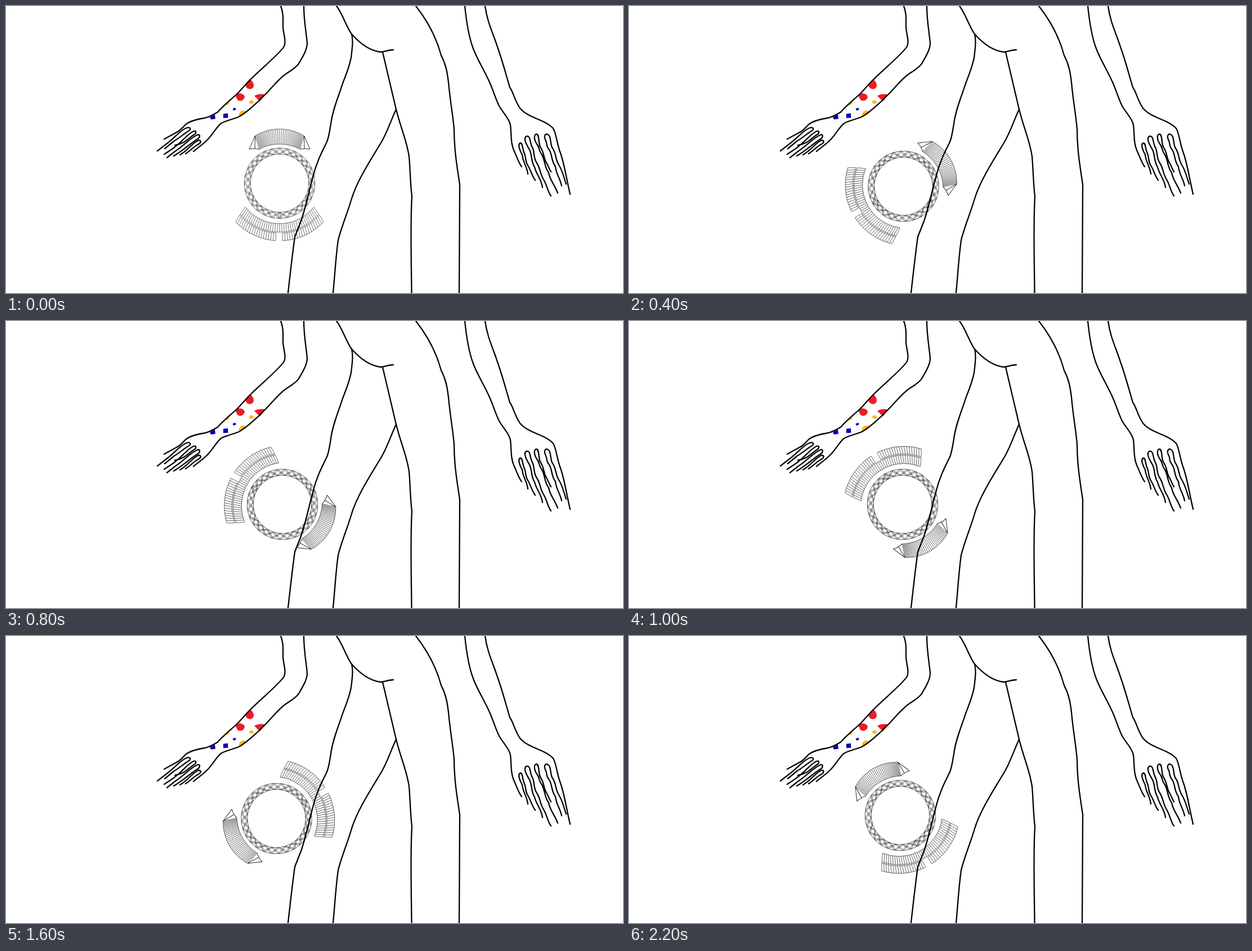
These frames come from a looping animation (1096x511 px, 2400 ms). An HTML page:

```html
<!DOCTYPE html>
<html lang="en">
<head>
<meta charset="utf-8">
<title>Turning ornament</title>
<style>
  html, body { margin: 0; width: 100%; height: 100%; overflow: hidden; background: #fff; }
  svg { display: block; width: 100%; height: 100%; }
  path { stroke-linejoin: round; }
</style>
</head>
<body>
<svg viewBox="0 0 1096 511">
  <g id="ornament" fill="none" stroke="#222" stroke-width=".65">
    <circle r="62.8"/>
    <circle r="51.8"/>
    <path id="lattice"/>
    <path id="bands"/>
    <path d="M-43.5-84.5L-54-60.5Q-45-63-36-60.5M-43.5-84.5L-44-61M43.5-84.5L54-60.5Q45-63 36-60.5M43.5-84.5L44-61" stroke="#111" stroke-width=".9"/>
  </g>

  <g fill="#ed1c24">
    <path d="M434 130L438 135C443 143 438 148 433 148C427 147 424 143 427 138Z"/>
    <path d="M407 158C412 153 424 156 424 162C422 170 412 171 410 165Z"/>
    <path d="M441 160C448 156 456 156 460 158L451 170Z"/>
  </g>
  <g fill="#fdb913">
    <path d="M388 176L395 169C399 174 395 177 388 176Z"/>
    <ellipse cx="436" cy="171" rx="4" ry="3"/>
    <path d="M414 197C412 186 424 183 427 189Z"/>
  </g>
  <g fill="#0404b4">
    <path d="M386 192L394 191 394.500 199 386 199.500Z"/>
    <path d="M402.500 183L407 181 409 184 404.500 186.500Z"/>
    <path d="M362 198L371 193 372 201 364 202Z"/>
  </g>

  <g fill="none" stroke="#000" stroke-width="2.3" stroke-linecap="round">
    <!-- left arm and hand -->
    <path d="M488 0C493 12 492 22 492 37C493 52 498 62 494 72C486 85 455 110 432 133L411 156C398 168 385 178 376 189C366 195 358 199 350 200C338 202 325 205 318 212C313 217 310 222 301 226L281 237"/>
    <path d="M529 0C529 25 533 45 535 66C535 78 527 90 521 101C517 109 506 115 497 121C483 131 472 146 460 158L449 169C437 180 425 192 412 198C402 202 390 204 382 209C374 215 368 228 357 239C347 249 342 251 333 259"/>
    <path d="M269 258L287 244C300 234 310 221 321 217C328 215 329 220 325 222C315 228 307 236 299 240L282 254"/>
    <path d="M281 264L296 254C312 243 322 228 333 223C339 221 338 227 334 229C322 237 318 245 300 248"/>
    <path d="M286 270L300 259C318 247 328 234 341 229C346 229 344 235 340 237C328 244 318 255 298 267"/>
    <path d="M309 265C322 258 332 243 342 239C348 239 346 244 342 246C334 250 328 257 319 263"/>
    <!-- right arm and hand -->
    <path d="M815 0C818 30 822 55 830 76C838 97 850 115 860 138C866 152 870 166 876 178C884 192 894 200 896 212C898 228 896 245 903 259C908 270 911 280 916 286"/>
    <path d="M851 0C855 30 866 50 873 73C882 98 888 122 895 145C902 155 902 165 913 182C928 200 958 202 972 218C978 228 978 244 985 262C992 282 995 305 1002 335"/>
    <path d="M927 299C925 284 918 278 917 265C911 254 909 245 914 244C918 244 917 255 921 263C924 270 922 276 927 284C933 294 934 302 940 310"/>
    <path d="M953 323C951 308 942 300 939 287C932 276 935 266 930 256C926 249 918 237 924 232C932 230 930 241 934 250C940 259 936 268 942 278C950 290 948 298 955 309C961 319 962 330 968 338"/>
    <path d="M980 333C974 317 966 310 964 297C956 286 958 276 952 265C945 256 948 250 943 246C937 236 938 229 942 228C948 229 945 241 949 251C957 262 954 270 960 279C964 286 965 291 968 295"/>
    <path d="M987 320C984 306 977 299 976 286C968 275 971 266 965 256C958 248 962 243 958 238C955 231 958 228 961 228C969 231 966 242 970 252C978 262 975 272 982 283C989 294 991 306 995 317"/>
    <!-- torso and legs -->
    <path d="M587 0C598 14 604 36 614 50C630 68 648 80 666 82C675 81 680 78 688 78"/>
    <path d="M614 50C617 62 615 75 613 92C609 112 603 124 598 138C590 163 580 185 577 210C574 228 573 237 569 244C560 262 551 280 545 305C537 335 532 360 524 383L513 411C509 440 505 475 501 511"/>
    <path d="M669 82L693 184C702 220 712 240 716 268C718 290 718 315 721 339C718 390 720 450 720.500 511"/>
    <path d="M693 184C684 203 677 225 667 242C649 272 624 310 614 343C606 370 596 393 590 417C586 445 584 480 581 511"/>
    <path d="M728 0C750 28 765 58 773 88C782 105 784 120 786 136C789 170 794 195 796 220C796 255 801 285 806 318L805 511"/>
  </g>
</svg>
<script>
const byId = id => document.getElementById(id);

// Angles run from straight down; a negative radius points up.
function point(radius, degrees, cy = 0) {
  const a = degrees * Math.PI / 180;
  return `${(radius * Math.sin(a)).toFixed(2)} ${(cy + radius * Math.cos(a)).toFixed(2)}`;
}
const line = points => 'M' + points.join('L');

// A ribbed strip between two arcs; from and to are shares of each half angle.
// A positive bunch crowds the ribs towards the ends.
function strip(inner, outer, from, to, count, bunch = 0) {
  const shares = Array.from({ length: count + 1 }, (_, i) => {
    const s = from + (to - from) * i / count;
    return s + bunch * Math.sin(Math.PI * s) / Math.PI;
  });
  const edge = ({ cy, r, half }) => shares.map(s => point(r, half * s, cy));
  const a = edge(inner), b = edge(outer);
  return line(a) + line(b) + a.map((p, i) => line([p, b[i]])).join('');
}

const skirt = r => ({ cy: -5, r, half: 52 - (r - 77) * .177 });
byId('bands').setAttribute('d',
  strip({ cy: 7, r: -76.5, half: 28 }, { cy: -13.5, r: -83, half: 31.6 }, -1, 1, 34, .3) +
  strip(skirt(77), skirt(92), -1, 1, 38) +
  strip(skirt(94), skirt(107.5), -1, -.08, 18) +
  strip(skirt(94), skirt(107.5), .06, 1, 18));

const cells = 28, cell = 360 / cells;
let lattice = line([point(51.8, -1.5), point(62.8, -1.5)]) + line([point(51.8, 1.5), point(62.8, 1.5)]);
for (let i = 0; i < cells; i++) {
  for (const shift of [-1.4, 1.4]) {
    const a = i * cell + shift;
    lattice += line([point(51.8, a), point(62.8, a + cell)]) + line([point(62.8, a), point(51.8, a + cell)]);
  }
}
byId('lattice').setAttribute('d', lattice);

// The ring sits off the pivot; the second half turn mirrors the first.
const pivot = [484, 323];
const offsets = [[2, -7.5], [3, -7.5], [3.5, -2], [8, 0], [7, 3.5], [2, 3.5]];

function draw(now) {
  const step = Math.floor(now / 200) % 12;
  const side = step < 6 ? 1 : -1;
  const [x, y] = offsets[step % 6].map((d, i) => pivot[i] + side * d);
  byId('ornament').setAttribute('transform', `translate(${x} ${y}) rotate(${step * 30})`);
  requestAnimationFrame(draw);
}
draw(0);
</script>
</body>
</html>
```
